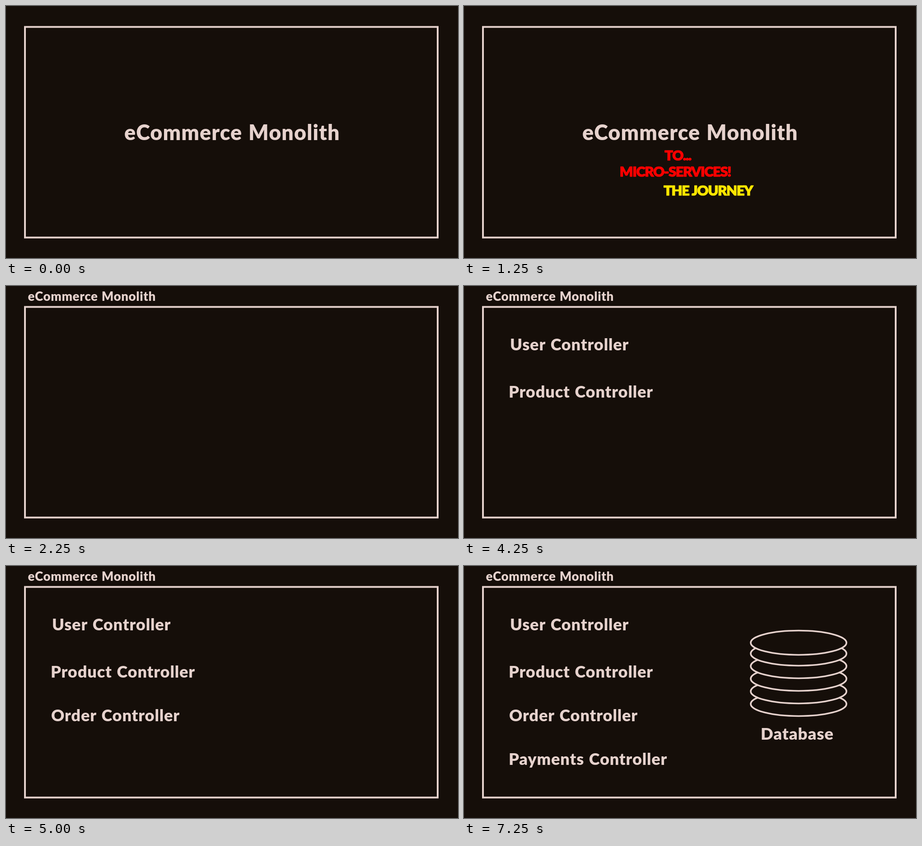
Recreate the animation shown at these times as an HTML page with a canvas. Size 1001 by 560 pixels, loop 8 s.

```html
<!DOCTYPE html>
<html lang="en">
<head>
<meta charset="utf-8">
<title>From monolith to micro-services</title>
<style>
  html, body { margin: 0; width: 100%; height: 100%; overflow: hidden; background: #150e09; }
  canvas { display: block; }
</style>
</head>
<body>
<canvas id="stage" width="1001" height="560"></canvas>
<script>
const ctx = document.getElementById('stage').getContext('2d');
const LOOP = 8000;
const BG = '#150e09', PALE = '#e6d2cd', RED = '#ff0000', YELLOW = '#ffe600';

// Places text by its visible ink: align 0 = left edge at x, 0.5 = centred on x.
function inkText(text, x, y, align) {
  const m = ctx.measureText(text);
  const ink = m.actualBoundingBoxLeft + m.actualBoundingBoxRight;
  const left = x + m.actualBoundingBoxLeft - ink * align;
  ctx.fillText(text, left, y);
  return left;
}

function label(text, x, y, size, align = 0) {
  ctx.font = `900 ${size}px Lato, sans-serif`;
  ctx.letterSpacing = `${size * 0.025}px`;
  ctx.wordSpacing = `${size * 0.04}px`;
  ctx.fillStyle = PALE;
  inkText(text, x, y, align);
}

function shout(text, x, y, color) {
  ctx.font = '900 31px Lato, sans-serif';
  ctx.letterSpacing = '-1.4px';
  ctx.wordSpacing = '0px';
  ctx.fillStyle = ctx.strokeStyle = color;
  ctx.lineWidth = 1.2;
  ctx.lineJoin = 'round';
  const left = inkText(text, x, y, 0.5);
  ctx.strokeText(text, left, y);
}

function disk(y) {
  ctx.beginPath();
  ctx.ellipse(741, y, 106, 27, 0, 0, Math.PI * 2);
  ctx.fillStyle = BG;
  ctx.fill();
  ctx.strokeStyle = PALE;
  ctx.lineWidth = 3.6;
  ctx.stroke();
}

function database() {
  for (let i = 0; i < 5; i++) disk(306.5 - 28 * i);
  disk(170.5);
  label('Database', 659, 385.5, 36.5);
}

const intro = [
  [0, () => label('eCommerce Monolith', 500, 298, 46.5, 0.5)],
  [250, () => shout('TO...', 474, 343, RED)],
  [750, () => shout('MICRO-SERVICES!', 469, 378.5, RED)],
  [1250, () => shout('THE JOURNEY', 542, 421, YELLOW)],
];

const diagram = [
  [2250, () => label('eCommerce Monolith', 48.5, 33, 27.6)],
  [3500, () => label('User Controller', 104, 143, 36)],
  [4250, () => label('Product Controller', 101, 247.5, 36)],
  [5000, () => label('Order Controller', 101, 344.5, 36)],
  [5750, () => label('Payments Controller', 101, 441.5, 36)],
  [7250, database],
];

function draw(t) {
  ctx.fillStyle = BG;
  ctx.fillRect(0, 0, 1001, 560);
  ctx.strokeStyle = PALE;
  ctx.lineWidth = 4;
  ctx.lineJoin = 'miter';
  ctx.strokeRect(42, 46.5, 914, 468);
  for (const [start, paint] of t < 2250 ? intro : diagram) {
    if (t >= start) paint();
  }
}

function tick() {
  draw(performance.now() % LOOP);
  requestAnimationFrame(tick);
}
tick();
</script>
</body>
</html>
```
